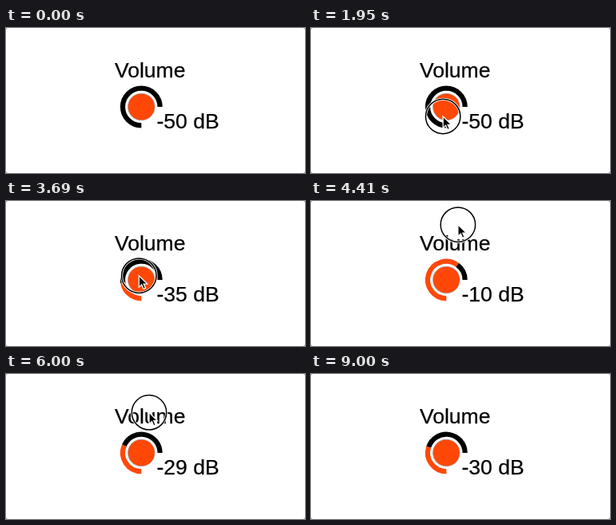
Recreate the animation shown at these times as an HTML page. Size 374x182 px, loop 9.42 s.

```html
<!DOCTYPE html>
<html lang="en">
<head>
<meta charset="utf-8">
<title>Volume knob</title>
<style>
  html, body { margin: 0; width: 100%; height: 100%; overflow: hidden; background: #aaa; }
  svg { display: block; width: 374px; height: 182px; }
  text { font: 26.5px "Liberation Sans", Arial, sans-serif; stroke: #000; stroke-width: .25px; }
</style>
</head>
<body>
<svg viewBox="0 0 374 182">
  <rect width="374" height="182" rx="3" fill="#fff"/>
  <text x="136" y="62">Volume</text>
  <text id="label" x="188.5" y="126"></text>
  <g transform="translate(169.3 99)">
    <g fill="none" stroke-width="6.2">
      <path id="track" stroke="#000"/>
      <path id="level" stroke="#ff4808"/>
    </g>
    <circle r="16.8" fill="#ff4808" stroke="#999" stroke-width=".7"/>
  </g>
  <g id="pointer">
    <g id="halo" fill="none">
      <circle r="21.7" stroke="#fff" stroke-width="3.2"/>
      <circle r="21.7" stroke="#000" stroke-width="1.5"/>
    </g>
    <path d="M0 0V14.5L3.4 11.4L5.7 16.7L8.2 15.6L5.9 10.4H10.5Z" stroke="#fff" stroke-width="1.3"/>
  </g>
</svg>
<script>
const LOOP = 9420, STEP = 30;
const PRESS = 1500, TURN = 4150, RELEASE = 8460;
// Pointer height that means 0 dB, before and after the drag overshoots the top
const ZERO_UP = 59, ZERO_DOWN = 19.5;
const RADIUS = 23.3;

const move = (start, duration, x, y, bowX = 0, bowY = 0) =>
  ({ start, duration, x, y, bowX, bowY });
const nudge = (start, dB) => move(start, 180, 179, ZERO_DOWN - dB);

const moves = [
  move(0, 660, 183, 150, -65, -118),
  move(840, 420, 165, 113, -17, -17),
  move(1800, 720, 166, 95),
  move(3660, 390, 185, 19),
  move(4230, 510, 181, 56.5),
  nudge(4920, -35), nudge(5250, -27), nudge(5610, -29), nudge(5970, -26),
  nudge(6390, -32), nudge(7050, -31), nudge(7920, -30),
  move(8880, 120, 208, 190)
];

const el = id => document.getElementById(id);
const clamp = (v, lo, hi) => Math.min(hi, Math.max(lo, v));
const ease = k => k * k * (3 - 2 * k);

function pointerAt(t) {
  let x = 254, y = 186;
  for (const m of moves) {
    const k = ease(clamp((t - m.start) / m.duration, 0, 1));
    const bow = Math.sin(Math.PI * k);
    x += (m.x - x) * k + m.bowX * bow;
    y += (m.y - y) * k + m.bowY * bow;
  }
  return [x, y];
}

// One pixel of drag is one dB
function volumeAt(t) {
  const y = pointerAt(clamp(t, PRESS, RELEASE))[1];
  const zero = t < TURN ? ZERO_UP : ZERO_DOWN;
  return Math.round(clamp(zero - y, -50, 0));
}

// Dial arc running clockwise from the bottom
function arc(from, to) {
  const point = f => {
    const a = Math.PI * (0.5 + 1.5 * f);
    return `${RADIUS * Math.cos(a)} ${RADIUS * Math.sin(a)}`;
  };
  const large = to - from > 2 / 3 ? 1 : 0;
  return to > from ? `M${point(from)}A${RADIUS} ${RADIUS} 0 ${large} 1 ${point(to)}` : "";
}

function draw(now) {
  const t = Math.floor((now % LOOP) / STEP) * STEP;
  const volume = volumeAt(t), level = (volume + 50) / 50;
  el("label").textContent = `${volume} dB`;
  el("track").setAttribute("d", arc(level, 1));
  el("level").setAttribute("d", arc(0, level));
  el("pointer").setAttribute("transform", `translate(${pointerAt(t)})`);
  el("halo").style.display = t >= PRESS && t < RELEASE ? "" : "none";
}

let start;
function tick(now) {
  start ??= now;
  draw(now - start);
  requestAnimationFrame(tick);
}
draw(0);
requestAnimationFrame(tick);
</script>
</body>
</html>
```
